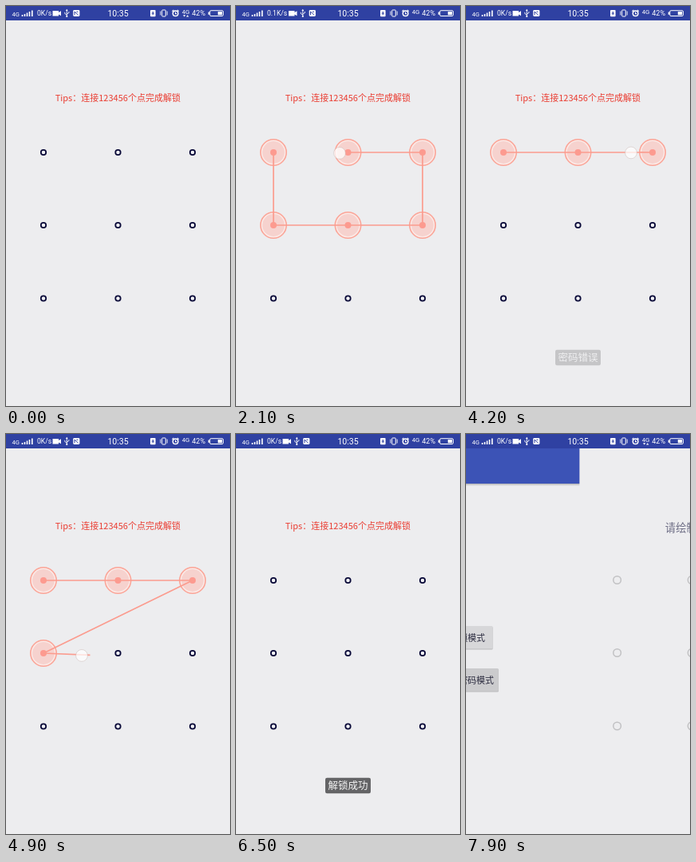
Write an HTML page that moves like this. It is 281x500 px and loops after 8 s.

```html
<!DOCTYPE html>
<html lang="zh-CN">
<head>
<meta charset="utf-8">
<title>Pattern unlock</title>
<style>
html, body { margin: 0; width: 100%; height: 100%; overflow: hidden; background: #ededef; }
svg { display: block; width: 100vw; height: 100vh; }
text { font-family: "Noto Sans CJK SC", "Noto Sans CJK", "Noto Sans", sans-serif; }
#status text { font-family: Roboto, "Noto Sans", sans-serif; fill: #fff; }
.mid { text-anchor: middle; }
.thin { font-weight: 300; }
</style>
</head>
<body>
<svg viewBox="0 0 281 500">
  <defs>
    <linearGradient id="shade" x2="0" y2="1">
      <stop stop-color="#000" stop-opacity=".25"/>
      <stop offset="1" stop-color="#000" stop-opacity="0"/>
    </linearGradient>
  </defs>
  <rect width="281" height="500" fill="#ededef"/>

  <g id="menu">
    <rect y="18" width="281" height="44" fill="#3c53b6"/>
    <rect y="62" width="281" height="3" fill="url(#shade)"/>
    <text x="13" y="45.5" font-size="15" fill="#fff">手势解锁</text>
    <rect x="109" y="240.8" width="63" height="28.8" rx="1.5" fill="#bbbbbd"/>
    <rect x="109" y="240" width="63" height="28.5" rx="1.5" fill="#d7d7d9"/>
    <text class="mid" x="140.5" y="258.5" font-size="10.9" fill="#2a2a3e">解锁模式</text>
    <rect x="102" y="293.8" width="77.3" height="28.8" rx="1.5" fill="#bbbbbd"/>
    <rect id="press" x="102" y="293" width="77.3" height="28.5" rx="1.5"/>
    <text class="mid" x="140.5" y="311.5" font-size="10.9" fill="#2a2a3e">设置密码模式</text>
  </g>

  <g id="lock">
    <rect y="18" width="281" height="482" fill="#ededef"/>
    <text class="mid thin" x="140.3" y="119" font-size="11" fill="#ea3d32">Tips：连接123456个点完成解锁</text>
    <g id="dots"></g>
    <polyline id="trail" fill="none" stroke="#fb9c8f" stroke-width="1.7" stroke-linejoin="round"/>
  </g>

  <g id="setup">
    <rect y="18" width="281" height="482" fill="#ededef"/>
    <text class="mid thin" x="140.5" y="122" font-size="13.3" fill="#6c6c84">请绘制密码</text>
    <g id="rings" fill="none" stroke="#c1c1c3" stroke-width="1.5"></g>
  </g>

  <g id="toast">
    <rect x="112" y="429.7" width="57" height="19.6" rx="2.2" fill="#646466"/>
    <text id="note" class="mid thin" x="140.4" y="444.3" font-size="12.5" fill="#f4f4f4"></text>
  </g>

  <circle id="finger" r="7.4" fill="#fff" fill-opacity=".72" stroke="#c9b5b2" stroke-opacity=".6" stroke-width=".8"/>

  <g id="status">
    <rect width="281" height="18" fill="#2f41a2"/>
    <text x="7.5" y="13" font-size="7.6">4G</text>
    <path d="M20.5 13v-2M23.5 13v-3M26.5 13v-4.5M29.5 13v-6M32.8 13v-7.5" stroke="#fff" stroke-width="1.6"/>
    <text id="speed" x="39" y="12.3" font-size="8.6"></text>
    <g id="icons" fill="#fff">
      <path d="M58.5 6h7.5v2l3-1.8v6l-3-1.8v2h-7.5z"/>
      <path d="M76.3 5v8M73.8 7.8v1.7l2.5 1.8M78.9 7v1.5l-2.6 1.7" fill="none" stroke="#fff" stroke-width=".9"/>
      <path d="M74.9 6l1.4-2.2 1.4 2.2z"/>
      <circle cx="76.3" cy="13" r="1.1"/>
      <rect x="84.2" y="5" width="8.2" height="8" rx="1.4"/>
      <path d="M86 11.3V7l4.6 4.3M88.4 7.2h2" fill="none" stroke="#2f41a2"/>
    </g>
    <text class="mid" x="140.6" y="12.8" font-size="10.6">10:35</text>
    <rect x="181" y="5" width="6.6" height="8.2" rx="1" fill="#fff"/>
    <path d="M184.3 6.8v4.6M182.7 9.1h3.2" stroke="#2f41a2"/>
    <g fill="none" stroke="#fff">
      <rect x="195.7" y="5" width="4.6" height="8" rx=".7"/>
      <path d="M193.8 6.5v5M202.2 6.5v5" stroke-width=".9"/>
      <circle cx="212.6" cy="9.3" r="3.3" stroke-width="1.5"/>
      <path d="M212.6 7.4v2.2h1.6M208.4 6.7l2-1.9M216.8 6.7l-2-1.9" stroke-width="1.1"/>
      <rect x="255.8" y="5.7" width="16.6" height="6.8" rx="1.3"/>
    </g>
    <text x="220.7" y="9.9" font-size="7.8">4G</text>
    <path id="arrows" d="M222 11.3h3.4l-1.7 2.2zM226 13.5h3.4l-1.7-2.2z" fill="#fff"/>
    <text x="233.3" y="12.4" font-size="9">42%</text>
    <path d="M253.7 7.5h1.6v3.2h-1.6zM265.8 7h5.3v4.2h-5.3z" fill="#fff"/>
  </g>
</svg>
<script>
const LOOP = 8000, STEP = 100, W = 281, REACH = 17;
const $ = id => document.getElementById(id);
const clamp = v => Math.max(0, Math.min(1, v));
const smooth = v => (v = clamp(v), v * v * (3 - 2 * v));
const show = (el, on) => el.setAttribute('visibility', on ? 'visible' : 'hidden');
const slide = (el, x) => el.setAttribute('transform', `translate(${x.toFixed(2)} 0)`);

const grid = [183, 274, 365.5].flatMap(y => [47, 140.5, 234].map(x => ({ x, y })));

// Touch paths as [time, x, y]
const strokes = [
  [[200, 47, 183], [300, 47, 187], [600, 48, 273], [900, 234.5, 272.7],
   [1100, 236, 262], [1450, 234, 184], [1900, 140.5, 183.3], [2200, 140.5, 183.3]],
  [[3500, 48, 181], [3650, 50, 181], [3950, 140, 182], [4250, 233, 183],
   [4350, 230, 185], [4700, 48, 274], [4900, 105.5, 276.3], [5250, 234, 275], [5500, 234, 275]]
];
const tap = [[7400, 141, 308], [7700, 141, 308]];
const toasts = [[2200, '密码错误'], [5500, '解锁成功']];

const ring = (p, r, fill, line, w) =>
  `<circle cx="${p.x}" cy="${p.y}" r="${r}" fill="${fill}" stroke="${line}" stroke-width="${w}"/>`;
$('dots').innerHTML = grid.map(p =>
  `<g>${ring(p, 3.2, '#f1f1f5', '#0a0a38', 1.8)}</g><g>` +
  ring(p, 16.2, '#fbe9e6', '#fba598', 1.6) +
  ring(p, 13.9, '#f6d2ce', 'none', 0) +
  ring(p, 4, '#fd9a90', 'none', 0) + '</g>').join('');
$('rings').innerHTML = grid.map(p => `<circle cx="${p.x}" cy="${p.y - 0.5}" r="4.8"/>`).join('');
const marks = [...$('dots').children];

const during = (path, t) => t >= path[0][0] && t < path[path.length - 1][0];

function touchAt(path, t) {
  const i = path.findIndex((k, n) => n && t < k[0]);
  const [t0, x0, y0] = path[i - 1], [t1, x1, y1] = path[i];
  const f = (t - t0) / (t1 - t0);
  return { x: x0 + (x1 - x0) * f, y: y0 + (y1 - y0) * f };
}

// Dots reached so far, in order
function hits(path, t) {
  const found = [];
  for (let s = path[0][0]; s <= t; s += 20) {
    const p = touchAt(path, s);
    const dot = grid.find(g => Math.hypot(g.x - p.x, g.y - p.y) < REACH);
    if (dot && !found.includes(dot)) found.push(dot);
  }
  return found;
}

function draw(t) {
  const stroke = strokes.find(s => during(s, t));
  const chain = stroke ? hits(stroke, t) : [];
  grid.forEach((g, i) => {
    const on = chain.includes(g);
    show(marks[2 * i], !on);
    show(marks[2 * i + 1], on);
  });

  const path = stroke || (during(tap, t) ? tap : null);
  const touch = path && touchAt(path, t);
  $('trail').setAttribute('points',
    stroke ? [...chain, touch].map(p => `${p.x},${p.y}`).join(' ') : '');
  show($('finger'), touch);
  if (touch) {
    // The touch marker sits a little left of the real contact point
    $('finger').setAttribute('cx', touch.x - 10.5);
    $('finger').setAttribute('cy', touch.y + 0.6);
  }

  const back = W * smooth((t - 6800) / 400);
  const next = W * (1 - smooth((t - 7702) / 400));
  slide($('lock'), back);
  slide($('menu'), t < 7700 ? back - W : next - W);
  slide($('setup'), next);
  $('press').setAttribute('fill', t >= 7500 ? '#cbcbcd' : '#d7d7d9');

  const toast = toasts.find(([s]) => t >= s && t < s + 2100);
  show($('toast'), toast);
  if (toast) {
    const age = t - toast[0];
    $('note').textContent = toast[1];
    $('toast').setAttribute('opacity', Math.min(clamp(age / 350), clamp((2100 - age) / 350)));
  }

  const busy = t >= 300 && t < 3000;
  $('speed').textContent = busy ? '0.1K/s' : '0K/s';
  slide($('icons'), busy ? 7.5 : 0);
  show($('arrows'), t < 300 || t >= 7800);
}

const start = performance.now();
function tick() {
  const t = (performance.now() - start) % LOOP;
  draw(Math.floor(t / STEP) * STEP);
  requestAnimationFrame(tick);
}
draw(0);
requestAnimationFrame(tick);
</script>
</body>
</html>
```
